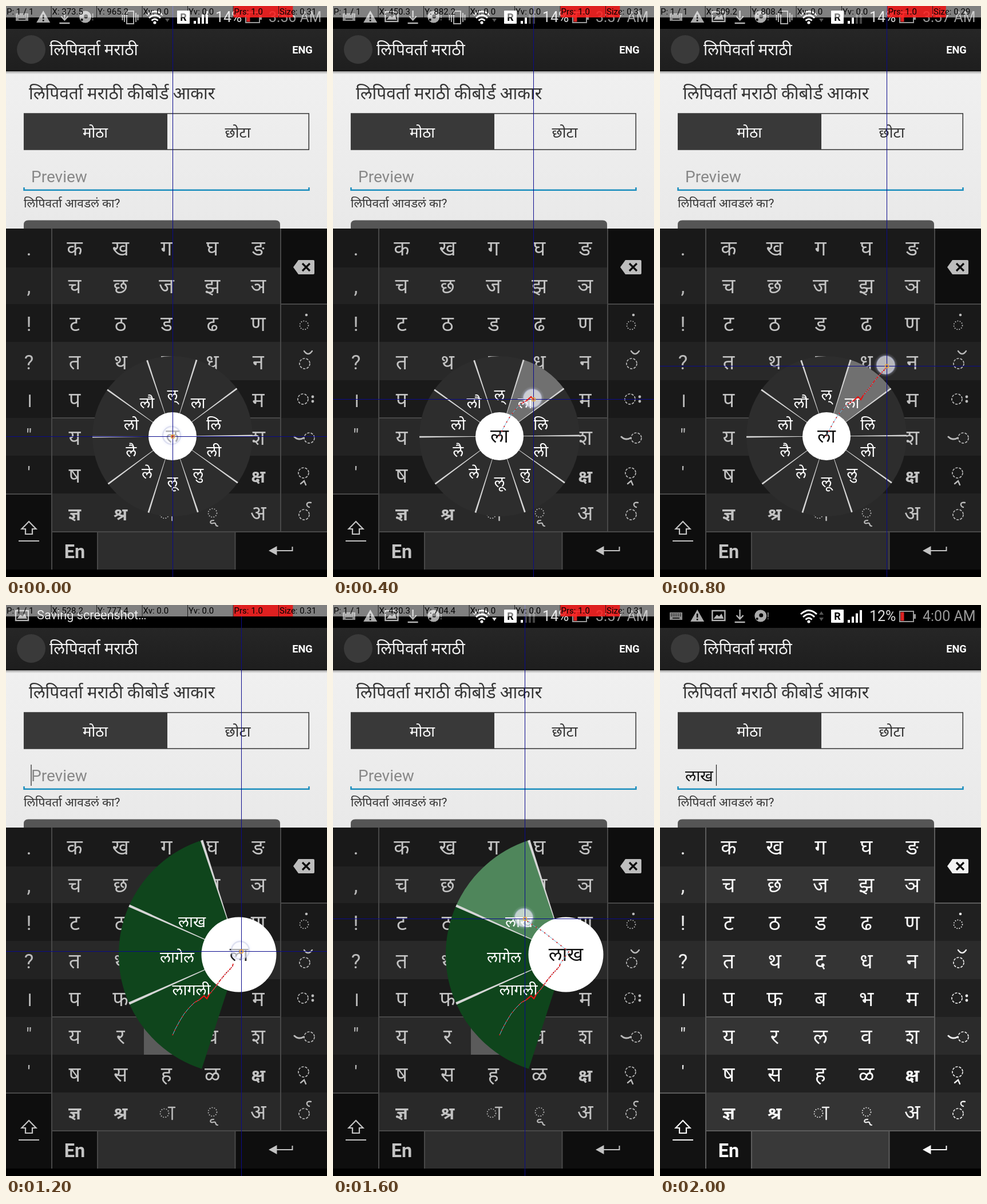
Animation of 561x998 px, one loop 2.4 s. Source, as an HTML page:

```html
<!DOCTYPE html>
<html lang="mr">
<head>
<meta charset="utf-8">
<title>Keyboard demo</title>
<style>
html, body { margin: 0; width: 100%; height: 100%; overflow: hidden; background: #000; }
svg { display: block; width: 100vw; height: 100vh; }
text { font-family: Roboto, "Noto Sans Devanagari", "Noto Sans", sans-serif; white-space: pre; }
</style>
</head>
<body>
<svg id="stage" viewBox="0 0 561 998" preserveAspectRatio="none"></svg>
<script>
const stage = document.getElementById('stage');
const K = 561 / 720; // device pixels to stage pixels

const rect = (x, y, w, h, fill, more = '') =>
  `<rect x="${x}" y="${y}" width="${w}" height="${h}" fill="${fill}" ${more}/>`;
const disc = (x, y, r, fill, more = '') =>
  `<circle cx="${x}" cy="${y}" r="${r}" fill="${fill}" ${more}/>`;
const path = (d, fill, stroke = 'none', width = 1, more = '') =>
  `<path d="${d}" fill="${fill}" stroke="${stroke}" stroke-width="${width}" ${more}/>`;
const text = (s, x, y, size, fill, anchor = 'start', more = '') =>
  `<text x="${x}" y="${y}" font-size="${size}" fill="${fill}" text-anchor="${anchor}" ${more}>${s}</text>`;
const mid = (s, x, y, size, fill, more) => text(s, x, y, size, fill, 'middle', more);
const polar = (cx, cy, r, deg) => {
  const a = deg * Math.PI / 180;
  return [cx + r * Math.cos(a), cy - r * Math.sin(a)];
};
const wedge = (cx, cy, r, from, to, fill) =>
  path(`M${cx} ${cy}L${polar(cx, cy, r, from)}A${r} ${r} 0 0 0 ${polar(cx, cy, r, to)}Z`, fill);
const spoke = (cx, cy, r, deg, width) => {
  const d = width / 2 / r * 180 / Math.PI;
  return path(`M${cx} ${cy}L${polar(cx, cy, r, deg - d)}L${polar(cx, cy, r, deg + d)}Z`, '#d6d6d6');
};

const states = [
  { x: 373.5, y: 965.2, size: .31, clock: '3:56', bars: 4, word: 'ल', trail: 1 },
  { x: 450.3, y: 882.2, size: .31, clock: '3:57', bars: 2, word: 'ला', trail: 9, picked: true },
  { x: 509.2, y: 808.4, size: .29, clock: '3:57', bars: 2, word: 'ला', trail: 15, picked: true },
  { x: 528.2, y: 777.4, size: .31, saving: true, word: 'ला', trail: 16, green: true, caret: 44 },
  { x: 430.3, y: 704.4, size: .31, clock: '3:57', bars: 1, word: 'लाख', trail: 21, green: true, picked: true },
  { clock: '4:00', bars: 4, caret: 98.5, typed: 'लाख' }
];

const trail = [
  [291, 752], [296, 741], [303, 728], [311, 715], [320, 704], [329, 695], [338, 690],
  [346, 683], [351, 688], [355, 681], [365, 669], [375, 655], [385, 643], [392, 636],
  [396, 631], [397, 627], [412, 606], [384, 584], [366, 570], [350, 560], [335, 549]
];

function page() {
  const name = 'लिपिवर्ता';
  return rect(0, 40, 561, 74, 'url(#bar)') + rect(0, 112, 561, 2, '#111') +
    disc(44, 76, 25, '#3a3a3a') +
    text(name + ' मराठी', 76, 86, 28, '#f4f4f4') +
    mid('ENG', 518, 83, 18.3, '#fff', 'font-weight="700"') +
    rect(0, 114, 561, 275, 'url(#paper)') + rect(0, 114, 561, 5, 'url(#shade)') +
    text(name + ' मराठी कीबोर्ड आकार', 40, 163, 29.8, '#333') +
    rect(31.7, 188, 497.6, 63, 'none', 'stroke="#333" stroke-width="1.5"') +
    rect(31, 188, 251, 63, '#393939') +
    mid('मोठा', 156, 229.5, 26, '#fff') + mid('छोटा', 405, 229.5, 26, '#333') +
    path('M31.5 317V321.7H529.5V317', 'none', '#1a8dbd', 2.5) +
    text(name + ' आवडलं का?', 31, 352, 21, '#333') +
    path('M31 389V382Q31 374.5 39 374.5H471Q479 374.5 479 382V389Z', '#555');
}

function marks() {
  const ring = (x, y, r = 9) =>
    disc(x, y, r, 'none', `stroke="#eee" stroke-width="1.7" stroke-dasharray="${r < 9 ? '1.8 2.4' : '4.2 2.2'}"`);
  const line = (d, w = 2.4) => path(d, 'none', '#eee', w, 'stroke-linecap="round"');
  return ring(277, 888, 7.5) + line('M284 878H295M290.5 878V899', 2.6) +
    ring(361, 886, 7.5) + line('M363 899C355 899 356 906 362 904C369 902 364 909 370 909', 2.2) +
    ring(521, 558, 7.5) + disc(525, 540, 2.3, '#eee') +
    ring(522, 625) + line('M521 603Q528 613 535 603') +
    ring(519, 687) + disc(536, 683, 2.4, '#eee') + disc(536, 691, 2.4, '#eee') +
    ring(530, 755) + line('M504 753Q511 760 520 755', 3) +
    ring(520, 816) + line('M515 835L521 830L524 837', 2.4) +
    ring(521, 889) + line('M533 868C523 866 525 875 530 876', 2.4);
}

function keyboard() {
  const tops = [389, 457, 521, 587, 654, 720, 786, 852, 918];
  const rows = ['क ख ग घ ङ', 'च छ ज झ ञ', 'ट ठ ड ढ ण', 'त थ द ध न',
    'प फ ब भ म', 'य र ल व श', 'ष स ह ळ क्ष', 'ज्ञ श्र - - अ'];
  const side = ['.', ',', '!', '?', '।', '"', "'"];
  const ink = '#fafafa', edge = '#5c5c5c';
  let s = rect(0, 389, 561, 596, '#121212');
  rows.forEach((row, i) => {
    const y = tops[i], h = tops[i + 1] - y, base = 436 + i * 66.2;
    s += rect(0, y, 561, h, i % 2 ? '#2b2b2b' : '#202020');
    s += rect(81, y, 399, h, i % 2 ? '#343434' : '#212121');
    if (i === 5) s += '<rect id="held" x="241" y="720" width="79" height="66" fill="#747474"/>';
    row.split(' ').forEach((c, j) => {
      const bold = /क्ष|ज्ञ|श्र/.test(c);
      if (c !== '-') s += mid(c, 120 + j * 80.2, base, bold ? 31 : 36, ink, bold ? 'font-weight="700"' : '');
    });
    if (side[i]) s += mid(side[i], 40, i > 4 ? base - 6 : base, i > 4 ? 32 : 35, '#eee');
  });
  s += marks();
  s += rect(481, 389, 80, 131, '#121212') + rect(0, 854, 79, 131, '#121212');
  s += rect(161, 920, 239, 65, '#393939');
  s += rect(79, 389, 2, 596, edge) + rect(479, 389, 2, 530, edge) + rect(481, 520, 80, 2, edge) +
    rect(81, 719, 398, 2, edge) + rect(0, 852, 79, 2, edge) + rect(81, 918, 480, 2, edge) +
    rect(159, 920, 2, 65, edge) + rect(399.5, 920, 2, 65, edge);
  s += path('M502 456.5L511 444H537Q539 444 539 446V467Q539 469 537 469H511Z', '#f2f2f2');
  s += path('M518 450L531 463M531 450L518 463', 'none', '#111', 3.2);
  s += path('M40 901L52.5 914H46V923H34V914H27.5ZM22 935H58', 'none', ink, 2.2);
  s += mid('En', 120, 965, 32.5, ink, 'font-weight="700"');
  s += path('M500.5 945V952H470', 'none', ink, 2) + path('M459 952L473.5 944V960Z', ink);
  s += rect(0, 985, 561, 13, '#000');
  return s;
}

function wheel(st) {
  const cx = 291, cy = 752, turn = .5;
  let s = disc(cx, cy, 140, '#2d2d2d');
  if (st.picked) s += wedge(cx, cy, 140, 36 + turn, 72 + turn, '#707070');
  for (let a = 0; a < 360; a += 36) s += spoke(cx, cy, 140, a + turn, 2.8);
  ['ल्', 'ला', 'लि', 'ली', 'लु', 'लू', 'ले', 'लै', 'लो', 'लौ'].forEach((c, i) => {
    const [x, y] = polar(cx, cy, 76, 90 - i * 36);
    s += mid(c, x, y + 12.5, 27, '#fff');
  });
  return s + disc(cx, cy, 42, '#fff') + mid(st.word, cx, 763, 33.5, '#111');
}

function fan(st) {
  const cx = 407, cy = 611;
  let s = '';
  for (let i = 0; i < 3; i++)
    s += wedge(cx, cy, 210, 108 + i * 48, 156 + i * 48, st.picked && !i ? '#4f865b' : '#0f451c');
  for (let i = 0; i < 3; i++) s += spoke(cx, cy, 210, 108 + i * 48, 4.4);
  s += mid('लाख', 325, 563, 27, '#fff') + mid('लागेल', 299, 625, 27, '#fff') + mid('लागली', 324, 682, 27, '#fff');
  return s + disc(cx, cy, 65.5, '#fff') + mid(st.word, cx, 622, 34, '#111');
}

const icons = {
  keys: x => {
    let s = rect(x - 11, 13, 22, 13, '#8c8c8c');
    for (let i = 0; i < 12; i++) s += rect(x - 9 + i % 6 * 3.2, 15 + (i / 6 | 0) * 3, 1.6, 1.6, '#000');
    return s + rect(x - 6, 22, 12, 1.6, '#000');
  },
  alert: x => path(`M${x} 8L${x + 12} 29H${x - 12}Z`, '#aaa') +
    rect(x - 1.3, 15, 2.6, 7, '#000') + rect(x - 1.3, 24, 2.6, 2.6, '#000'),
  image: x => rect(x - 11, 10, 22, 17, 'none', 'stroke="#b5b5b5" stroke-width="2.4"') +
    path(`M${x - 9} 24L${x - 3} 17L${x + 1} 20L${x + 5} 15L${x + 9} 24Z`, '#b5b5b5'),
  load: x => path(`M${x} 8V24M${x - 6} 18L${x} 24.5L${x + 6} 18M${x - 9} 30H${x + 9}`, 'none', '#b5b5b5', 2.4),
  disk: x => disc(x - 1, 19, 10.5, '#aaa') + disc(x, 18, 3.5, '#000') + disc(x - 7, 24, 2, '#000') +
    text('!', x + 10, 25, 16, '#aaa')
};

function status(st) {
  if (st.saving) return icons.image(28) + text('Saving screenshot…', 54, 25, 21.7, '#ddd');
  const late = st !== states[0];
  const list = late ? ['keys', 'alert', 'image', 'load', 'disk'] : ['keys', 'alert', 'load', 'disk'];
  let s = list.map((n, i) => icons[n](28 + i * 37.2)).join('');
  if (st.x && !st.green)
    s += rect(211, 9, 12, 22, 'none', 'stroke="#aaa" stroke-width="2"') +
      path('M207 12V28M227 12V28M203.5 15V25M230.5 15V25', 'none', '#aaa', 2);
  s += path('M246 16Q260 3 274 16M250 21Q260 11 270 21M254.5 25.5Q260 20 265.5 25.5', 'none', '#fff', 3) +
    disc(260, 29, 2.6, '#fff');
  s += path('M278 22H286L282 28Z', st.green ? '#ddd' : '#555');
  if (!st.x) s += path('M278 17H286L282 11Z', '#555');
  s += rect(299, 8, 22, 23, '#fff', 'rx="1"') + mid('R', 310, 26, 18, '#000', 'font-weight="700"');
  for (let i = 0; i < 4; i++) {
    const h = 5 + i * 5.7;
    s += rect(328 + i * 7, 31 - h, 4, h, i < st.bars ? '#fff' : '#444');
  }
  return s + text(st.x ? '14%' : '12%', 366, 28, 25, '#ddd') +
    rect(419, 11, 24, 18, 'none', 'stroke="#999" stroke-width="2"') + rect(444, 16, 3, 8, '#999') +
    rect(420.5, 12.5, 6, 15, '#d22') + text(st.clock + ' AM', 459, 28, 25, '#999');
}

function readout(st) {
  const w = 79.5;
  const labels = ['P: 1 / 1', `X: ${st.x}`, `Y: ${st.y}`, 'Xv: 0.0', 'Yv: 0.0', 'Prs: 1.0', `Size: ${st.size}`];
  return labels.map((label, i) => {
    const x = i * w;
    const level = i === 5 ? 1 : i === 6 ? st.size : 0;
    return rect(x, 0, i === 6 ? 84 : w - .8, 20, '#fff', 'opacity=".5"') +
      (level ? rect(x, 0, (w - .8) * level, 20, '#f00', 'opacity=".75"') : '') +
      text(label, x + 1, 15, 15, '#000');
  }).join('');
}

function touch(st) {
  // Snap to pixel centres so the cross hairs stay crisp.
  const x = Math.floor(st.x * K) + .5, y = Math.floor(st.y * K) + .5;
  const line = (pts, color, w, dash) =>
    path('M' + pts.join('L'), 'none', color, w, dash ? `stroke-dasharray="${dash}"` : '');
  const pts = trail.slice(0, st.trail);
  let s = disc(x - 2, y - 2, 21, 'url(#glow)') +
    disc(x - 2, y - 2, 15.5, '#fff', 'fill-opacity=".55" stroke="#c3c8e2" stroke-opacity=".5" stroke-width="2.5"');
  s += path(`M0 ${y}H561M${x} 0V998`, 'none', '#0a0a8c', 1);
  if (pts.length > 1) {
    s += line(pts, '#79b4d8', 1) + line(pts, '#e01818', 1.8, '2 7');
    if (pts.length > 6) s += line(pts.slice(5, 16), '#e81414', 1.8, '2 2');
    if (pts.length > 8) s += line(pts.slice(6, 10), '#e81414', 2);
  } else s += disc(291, 752, 1.5, '#e01818');
  return s + disc(x, y, 3, 'none', 'stroke="#e9a53c" stroke-width="1.5"') + readout(st);
}

stage.innerHTML = `<defs>
  <linearGradient id="bar" x2="0" y2="1"><stop stop-color="#262626"/><stop offset="1" stop-color="#1e1e1e"/></linearGradient>
  <linearGradient id="paper" x2="0" y2="1"><stop stop-color="#f0f0f0"/><stop offset="1" stop-color="#e9e9e9"/></linearGradient>
  <linearGradient id="shade" x2="0" y2="1"><stop stop-color="#777" stop-opacity=".7"/><stop offset="1" stop-color="#777" stop-opacity="0"/></linearGradient>
  <radialGradient id="glow"><stop offset=".7" stop-color="#dde2ff" stop-opacity=".3"/><stop offset="1" stop-color="#dde2ff" stop-opacity="0"/></radialGradient>
  </defs>` + rect(0, 0, 561, 998, '#000') + page() + '<g id="field"></g>' + keyboard() +
  rect(0, 389, 561, 596, '#000', 'id="dim" opacity=".22"') + '<g id="live"></g>';

const [field, held, dim, live] = ['field', 'held', 'dim', 'live'].map(id => document.getElementById(id));
let shown = -1;

function render(t) {
  const i = Math.floor(t % 2400 / 400);
  if (i === shown) return;
  shown = i;
  const st = states[i], active = 'x' in st;
  field.innerHTML = text(st.typed || 'Preview', 44, 308, st.typed ? 27.5 : 28, st.typed ? '#111' : '#888') +
    (st.caret ? rect(st.caret - .6, 279, 1.2, 37, '#222') : '');
  held.style.display = dim.style.display = active ? '' : 'none';
  live.innerHTML = status(st) + (active ? (st.green ? fan(st) : wheel(st)) + touch(st) : '');
}

const start = performance.now();
function tick() {
  render(performance.now() - start);
  requestAnimationFrame(tick);
}
tick();
</script>
</body>
</html>
```
